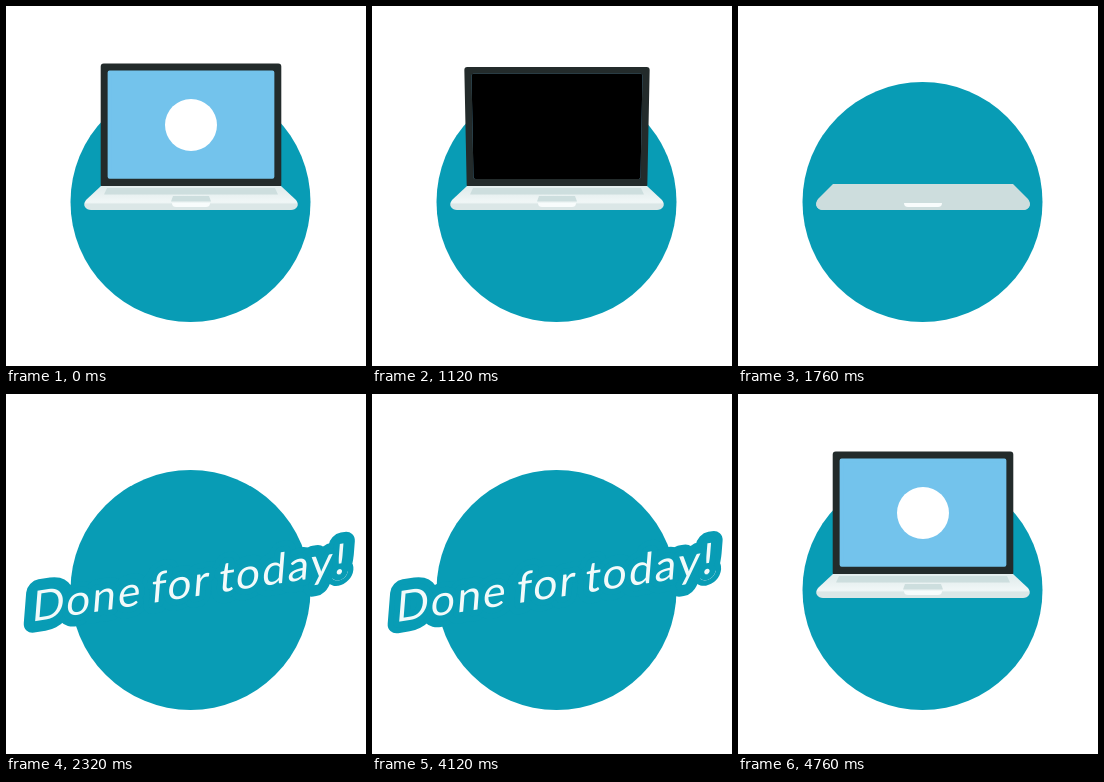
Animation, 360 px wide and 360 px high, one loop 4.8 s. Source, as an HTML page:

```html
<!DOCTYPE html>
<html lang="en">
<head>
<meta charset="utf-8">
<title>Done for today</title>
<style>
  html, body { margin: 0; width: 100%; height: 100%; overflow: hidden; background: #fff; }
  svg { display: block; width: 100%; height: 100%; }
  text {
    font: 43px Lato, sans-serif;
    letter-spacing: 2px;
    word-spacing: -4px;
    text-anchor: middle;
    fill: #f2fafa;
    stroke-linejoin: round;
  }
  .halo { fill: #089cb5; stroke: #089cb5; stroke-width: 23px; }
  .inner { stroke-width: 12px; }
</style>
</head>
<body>
<svg viewBox="0 0 360 360">
  <defs>
    <linearGradient id="shell" x2="0" y2="1">
      <stop offset=".2" stop-color="#e4eeee"/>
      <stop offset=".68" stop-color="#f1f7f7"/>
      <stop offset=".76" stop-color="#dbe7e7"/>
    </linearGradient>
  </defs>
  <circle cx="184.5" cy="196" r="120" fill="#089cb5"/>
  <g id="laptop">
    <g id="lid">
      <path id="bezel" fill="#232b2b" stroke="#232b2b" stroke-width="6" stroke-linejoin="round"/>
      <path id="screen" fill="#73c3ec" stroke="#73c3ec" stroke-width="4" stroke-linejoin="round"/>
      <circle id="badge" cx="185" cy="119" r="26" fill="#fff"/>
      <path id="shade" stroke="#000" stroke-width="4" stroke-linejoin="round"/>
    </g>
    <path fill="url(#shell)" d="M95 180H275L290 194Q293 198 291 201 289 204 285 204H85Q81 204 79 201 77 198 80 194Z"/>
    <path fill="#cddede" d="M101 182H269L272 188.500H98ZM167 190H203L205 195.500H165Z"/>
    <path id="cover" fill="#cddddd" d="M95 178H275L290 193Q293 197 291 201 289 204 285 204H85Q81 204 79 201 77 197 80 193Z"/>
    <path fill="#f8fcfc" d="M166 197H204Q204 201 200 201H170Q166 201 166 197Z"/>
  </g>
  <g id="message">
    <g transform="matrix(1 -.155 -.08 1 183 203.500)">
      <text class="halo">Done for today!</text>
      <text class="halo inner">Done for today!</text>
      <text>Done for today!</text>
    </g>
  </g>
</svg>
<script>
  const LOOP = 4800;
  const get = id => document.getElementById(id);
  const [laptop, lid, bezel, screen, badge, shade, cover, message] =
    ['laptop', 'lid', 'bezel', 'screen', 'badge', 'shade', 'cover', 'message'].map(get);
  const progress = (t, from, to) => Math.min(1, Math.max(0, (t - from) / (to - from)));

  // Panel hinged at y = 180: half is its width share, low and high its heights.
  function panel(angle, half, low, high) {
    const rise = 123 * Math.cos(angle) - 24 * Math.sin(angle);
    const point = (side, v) =>
      `${185 + side * half * (90 + 22 * Math.sin(angle) * v)} ${180 - v * rise}`;
    return `M${point(-1, low)}L${point(-1, high)}L${point(1, high)}L${point(1, low)}Z`;
  }

  function draw(t) {
    const angle = Math.PI / 2 * progress(t, 750, 1640) ** 3;
    const dim = progress(t, 300, 1100);
    const back = progress(t, 4400, 4680);
    const returning = t > 4000;
    const fold = returning ? 0 : angle;
    const shut = Math.tan(fold) > 123 / 24;

    bezel.setAttribute('d', panel(fold, .97, .01, .971));
    const glass = panel(fold, .904, .075, .922);
    screen.setAttribute('d', glass);
    shade.setAttribute('d', glass);
    shade.setAttribute('opacity', returning ? 0 : dim);
    badge.setAttribute('opacity', !returning && dim === 1 ? 0 : 1);
    lid.setAttribute('display', shut ? 'none' : 'inline');
    cover.setAttribute('display', shut ? 'inline' : 'none');
    laptop.setAttribute('opacity', returning ? back : 1 - progress(t, 1780, 1920));

    const size = 1 - (1 - progress(t, 1840, 2460)) ** 3;
    message.setAttribute('display', size > 0 ? 'inline' : 'none');
    message.setAttribute('transform', `translate(182.500 190) scale(${size}) translate(-182.500 -190)`);
    message.setAttribute('opacity', 1 - back);
  }

  function tick() {
    draw(performance.now() % LOOP);
    requestAnimationFrame(tick);
  }
  tick();
</script>
</body>
</html>
```
